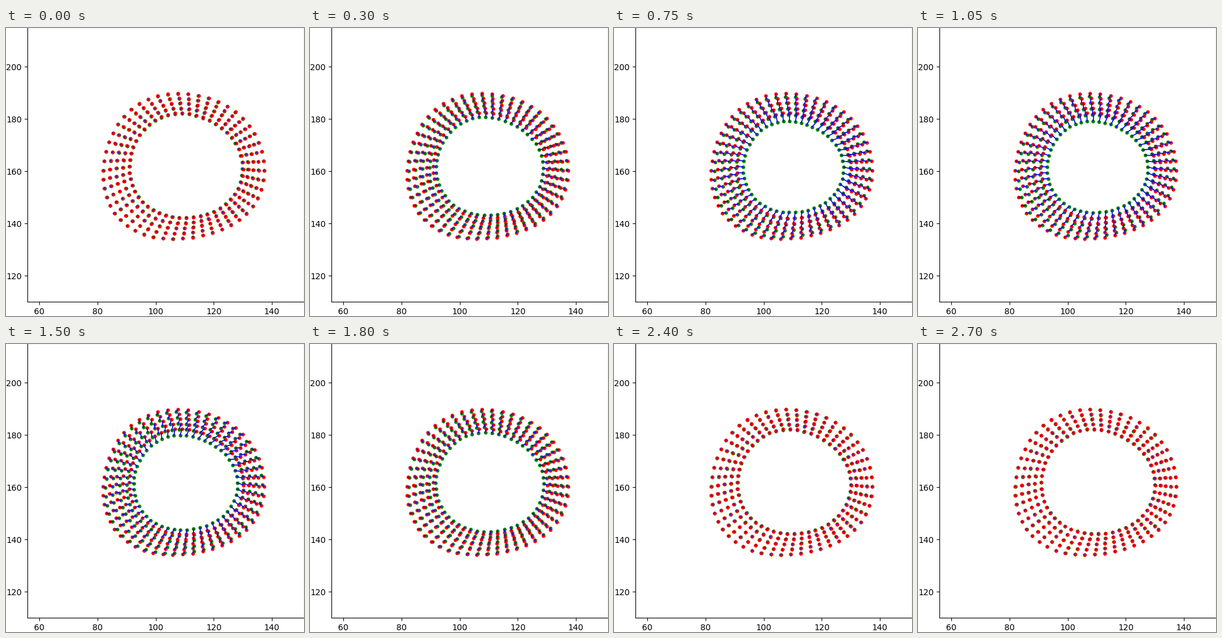
These frames come from a looping animation (501 px wide and 485 px high, 2.85 s). A matplotlib script:

```python
import matplotlib.pyplot as plt
import numpy as np
from matplotlib.animation import FuncAnimation

W, H, DPI = 501, 485, 100
FRAMES, INTERVAL = 19, 150
SPOKES, LAYERS = 50, 5
LEFT, RIGHT, BOTTOM, TOP = 36.4, 500.9, 23.6, 485.6
XLIM, YLIM = (56, 151), (110, 215)

# Key points of both walls, clockwise from the top, in stage pixels.
OUTER = [289 + 110j, 372 + 132j, 425 + 193j, 429 + 272j, 378 + 332j,
         297 + 354.5j, 217 + 341.5j, 169 + 285j, 168 + 208j, 210.5 + 137j]
INNER = [296 + 143j, 353 + 161j, 392 + 204j, 395 + 260j, 360 + 304j,
         303 + 320j, 247 + 307j, 212 + 265j, 210 + 211j, 240.5 + 162j]


def smooth_ring(points):
    """Closed Fourier curve through the points, as complex x + iy."""
    n = len(points)
    order = np.arange(n) - n // 2 + 1
    coef = np.fft.fft(points)[order] / n
    turn = 2j * np.pi * np.arange(SPOKES) / SPOKES
    return np.exp(np.outer(turn, order)) @ coef


def to_data(z):
    x = XLIM[0] + (z.real - LEFT) * (XLIM[1] - XLIM[0]) / (RIGHT - LEFT)
    y = YLIM[0] + (H - BOTTOM - z.imag) * (YLIM[1] - YLIM[0]) / (TOP - BOTTOM)
    return x, y


def sigmoid(t):
    return 1 / (1 + np.exp(-t))


depth = np.linspace(0, 1, LAYERS)[:, None]
outer, inner = smooth_ring(OUTER), smooth_ring(INNER)
rest = (outer + (inner - outer) * depth).ravel()
depth = np.repeat(depth, SPOKES)

outward = rest - inner.mean()
outward /= abs(outward)
cos, sin = outward.real, -outward.imag
shorten = ((1 - depth) * (4.9 - 0.3 * cos + 0.5 * sin)
           + depth * (11.7 + 1.5 * cos + 2 * sin))
twist = (1 - depth) * (2.3 + 0.5 * cos - sin) + depth * (2.1 + cos)


def moved(i):
    """Positions in the contraction cycle: quick squeeze, slower release."""
    squeeze = 0.04 + sigmoid((i - 2.1) / 0.75) * sigmoid((11.4 - i) / 1.5)
    recoil = 1.2 * np.exp(-((i - 10) / 2) ** 2) * (1 + sin)
    return rest - (squeeze * (shorten + 1j * twist) + 1j * recoil) * outward


fig = plt.figure(figsize=(W / DPI, (H + 1e-6) / DPI), dpi=DPI)  # avoids truncation to H - 1
ax = fig.add_axes([LEFT / W, BOTTOM / H, (RIGHT - LEFT) / W, (TOP - BOTTOM) / H])
ax.set(xlim=XLIM, ylim=YLIM, xticks=range(60, 141, 20), yticks=range(120, 201, 20))

current, = ax.plot([], [], "g.", markersize=6.8)
ax.plot(*to_data(rest), "r.", markersize=6.8)
paths, = ax.plot([], [], "b-", linewidth=1.2, solid_capstyle="round")


def update(i):
    x, y = to_data(moved(i))
    x0, y0 = to_data(rest)
    gap = np.full_like(x, np.nan)
    current.set_data(x, y)
    paths.set_data(np.column_stack([x0, x, gap]).ravel(),
                   np.column_stack([y0, y, gap]).ravel())
    return current, paths


anim = FuncAnimation(fig, update, frames=FRAMES, interval=INTERVAL,
                     repeat=True, repeat_delay=0)
plt.show()
```
